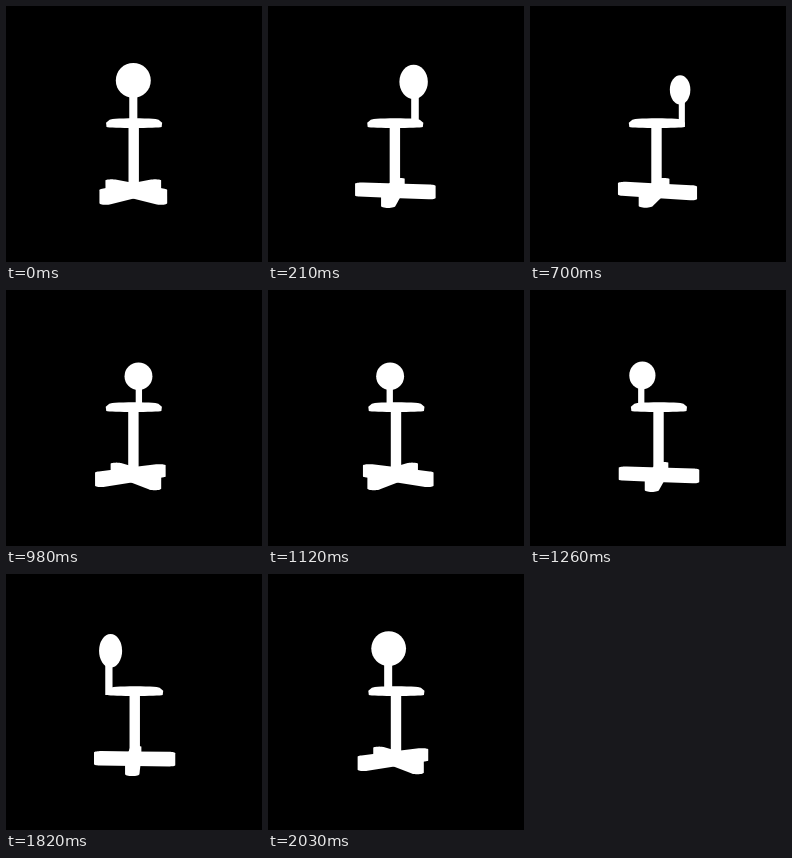
An HTML page with a canvas that plays this animation: 256x256 px, repeating every 2.1 s.

```html
<!DOCTYPE html>
<html lang="en">
<head>
<meta charset="utf-8">
<title>Turning chair</title>
<style>
html, body { margin: 0; width: 100%; height: 100%; overflow: hidden; background: #000; }
canvas { display: block; width: 256px; height: 256px; }
</style>
</head>
<body>
<canvas id="stage" width="256" height="256"></canvas>
<script>
const ctx = document.getElementById('stage').getContext('2d');
const STEP = 70, STEPS = 30;
const HORIZON = 130, DEPTH = 250;
const TAU = Math.PI * 2;
const { sin, cos, abs } = Math;

// Magnification of a point that is z closer to the viewer than the axis
const scaleAt = z => DEPTH / (DEPTH - z);

// x to the right, h above the horizon, z toward the viewer
function project(cx, x, h, z) {
  const s = scaleAt(z);
  return [cx + x * s, HORIZON - h * s];
}

function hull(points) {
  points.sort((a, b) => a[0] - b[0] || a[1] - b[1]);
  const half = list => {
    const out = [];
    for (const p of list) {
      while (out.length > 1) {
        const [a, b] = out.slice(-2);
        if ((b[0] - a[0]) * (p[1] - a[1]) - (b[1] - a[1]) * (p[0] - a[0]) > 0) break;
        out.pop();
      }
      out.push(p);
    }
    return out.slice(0, -1);
  };
  return half(points).concat(half(points.slice().reverse()));
}

function fillHull(points) {
  ctx.beginPath();
  for (const [x, y] of hull(points)) ctx.lineTo(x, y);
  ctx.fill();
}

// Points of a horizontal circle in perspective
function ring(cx, x, z, r, h) {
  return Array.from({ length: 32 }, (_, i) => {
    const a = i / 32 * TAU;
    return project(cx, x + r * sin(a), h, z + r * cos(a));
  });
}

function drawLeg(cx, angle) {
  const x = 34.4 * sin(angle), z = 34.4 * cos(angle), r = 6.2;
  const points = [];
  for (const h of [-48.6, -60.4]) {
    points.push(...ring(cx, 0, 0, r, h), ...ring(cx, x, z, r, h));
  }
  fillHull(points);
}

function drawSeat(cx) {
  fillHull([
    ...ring(cx, 0, 0, 24.5, 16),
    ...ring(cx, 0, 0, 28, 13),
    ...ring(cx, 0, 0, 27.5, 8.9)
  ]);
}

function drawBack(cx, angle) {
  const side = sin(angle), near = cos(angle);
  const s = scaleAt(30 * near);
  const [x, y] = project(cx, 29.4 * side, 48.9, 30 * near);
  const rx = s * 15.4 * abs(cos(angle + 0.12 * side)) + 2 * abs(side);

  const stemX = cx + 31.5 * side * s;
  const w = (5.8 + 1.3 * abs(near)) * s;
  ctx.fillRect(stemX - w / 2, y, w, 121 - y);

  ctx.beginPath();
  ctx.ellipse(x, y, rx, 15.4 * s, 0, 0, TAU);
  ctx.fill();
}

function draw(angle) {
  const cx = 127.3 - 1.4 * sin(angle);
  ctx.fillStyle = '#000';
  ctx.fillRect(0, 0, 256, 256);
  ctx.fillStyle = '#fff';

  for (let i = 0; i < 4; i++) drawLeg(cx, angle + TAU / 8 + i * TAU / 4);
  ctx.fillRect(cx - 4.8, 118, 10.4, 68);
  drawSeat(cx + 0.8);
  drawBack(cx, angle);
}

function tick() {
  const step = Math.floor(performance.now() / STEP) % STEPS;
  draw(step / STEPS * TAU);
  requestAnimationFrame(tick);
}
tick();
</script>
</body>
</html>
```
